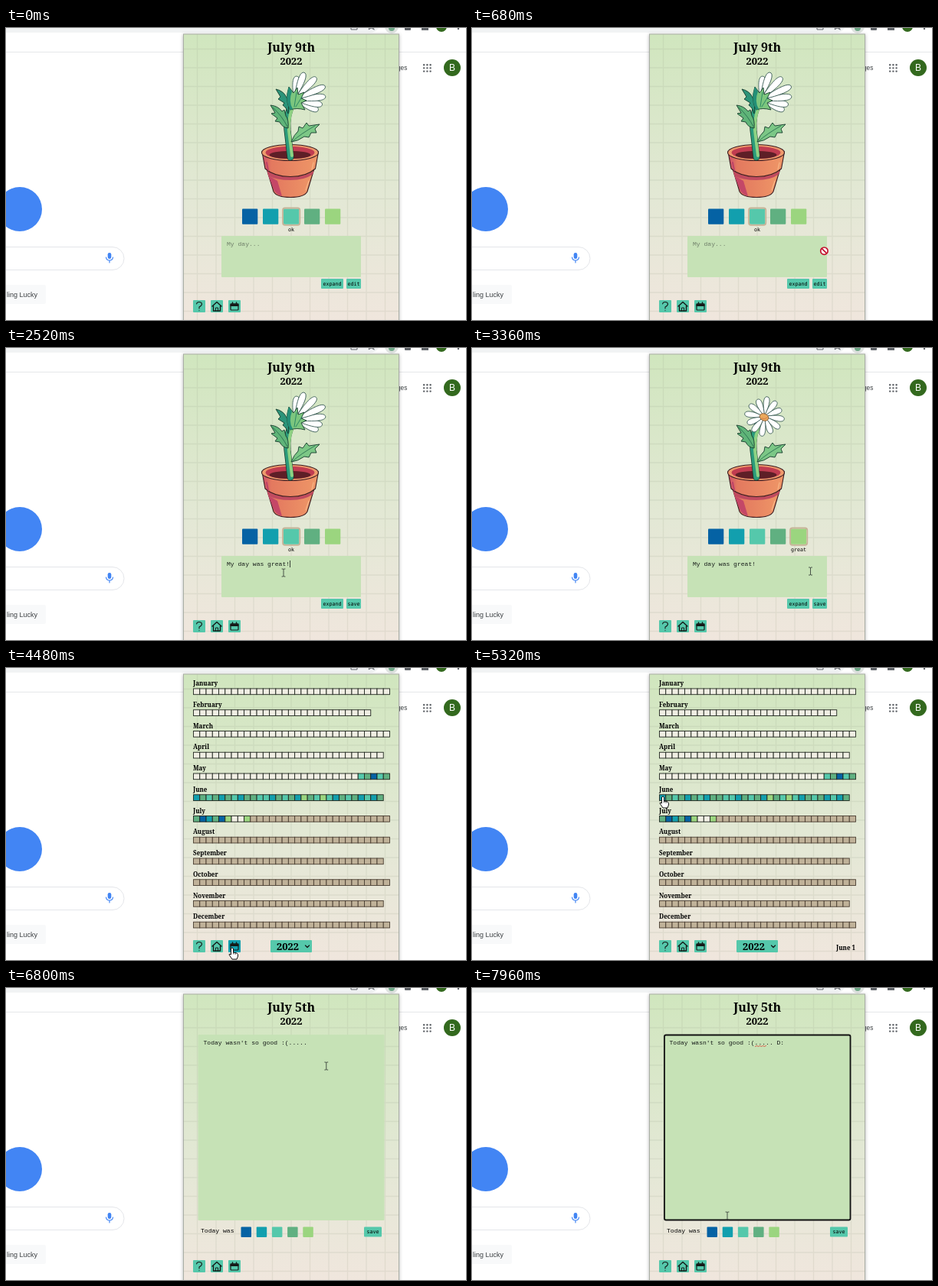
An HTML page that plays this animation: 600x382 px, repeating every 8 s.

```html
<!DOCTYPE html>
<html lang="en">
<head>
<meta charset="utf-8">
<title>Mood diary</title>
<style>
  html, body { margin: 0; width: 100%; height: 100%; overflow: hidden; background: #fff; }
  svg { display: block; width: 100%; height: 100%; }
  text { white-space: pre; }
  .sans { font: 9px "Liberation Sans", Arial, sans-serif; fill: #3c4043; }
  .serif { font: bold 8px "Noto Serif", serif; }
  .mono { font: 8.05px "Liberation Mono", monospace; }
  .label { font: 6.67px "DejaVu Sans Mono", monospace; }
</style>
</head>
<body>
<svg viewBox="0 0 600 382">
  <defs>
    <linearGradient id="paper" x2="0" y2="1">
      <stop stop-color="#d0e6be"/><stop offset=".55" stop-color="#e3e8d5"/><stop offset="1" stop-color="#f1e6de"/>
    </linearGradient>
    <linearGradient id="clay">
      <stop stop-color="#c9486a"/><stop offset=".16" stop-color="#e3795f"/><stop offset="1" stop-color="#ef9767"/>
    </linearGradient>
    <filter id="shadow" x="-10%" y="-10%" width="120%" height="120%">
      <feDropShadow dx="0" dy="1" stdDeviation="2" flood-opacity=".3"/>
    </filter>
  </defs>
  <g id="page"></g>
  <g id="scene"></g>
  <g id="cursor"></g>
</svg>
<script>
const LOOP = 8000;
const MOODS = ['#0562a4', '#129fae', '#55c8ab', '#60b081', '#9bd57f'];
const INK = '#151a18', FIELD = '#c6e2b6';
const MONTHS = ['January', 'February', 'March', 'April', 'May', 'June', 'July',
  'August', 'September', 'October', 'November', 'December'];
const DAYS = [31, 28, 31, 30, 31, 30, 31, 31, 30, 31, 30, 31];
// Mood index per day; "-" is a day without an entry.
const ENTRIES = {
  4: '-'.repeat(26) + '23023',
  5: '132313213322132314324213231213',
  6: '301304--4'
};
const CELL = 256 / 31, ROW = 27.75;

const layer = id => document.getElementById(id);
const repeat = (n, make) => Array.from({ length: n }, (_, i) => make(i)).join('');
const clamp = v => Math.max(0, Math.min(1, v));
const rect = (x, y, w, h, fill, more = '') =>
  `<rect x="${x}" y="${y}" width="${w}" height="${h}" fill="${fill}" ${more}/>`;
const path = (d, fill, more = '') => `<path d="${d}" fill="${fill}" ${more}/>`;
const line = (d, width = 1, color = INK) =>
  path(d, 'none', `stroke="${color}" stroke-width="${width}" stroke-linecap="round" stroke-linejoin="round"`);
const text = (x, y, str, kind, more = '') => `<text x="${x}" y="${y}" class="${kind}" ${more}>${str}</text>`;
const MIDDLE = 'text-anchor="middle"';

// Cursor stops: time, x, y
const STOPS = [
  [40, 503, -20], [200, 503, 4], [820, 453, 334], [1020, 453, 334], [1400, 362, 294],
  [2540, 362, 294], [2800, 426, 247], [3000, 426, 247], [3300, 441.5, 292], [3400, 441.5, 292],
  [3580, 454, 335], [3720, 454, 335], [4120, 295, 366], [4720, 295, 366], [5240, 249, 168],
  [5360, 249, 168], [5560, 281, 199], [6040, 281, 199], [6420, 478, 319], [6580, 478, 319],
  [6860, 410, 74], [7560, 410, 74], [7920, 333, 298]
];

function cursorAt(t) {
  const next = STOPS.findIndex(s => s[0] > t);
  if (next === 0) return STOPS[0].slice(1);
  if (next < 0) return STOPS.at(-1).slice(1);
  const [t0, x0, y0] = STOPS[next - 1], [t1, x1, y1] = STOPS[next];
  const p = (t - t0) / (t1 - t0), e = p * p * (3 - 2 * p);
  return [x0 + (x1 - x0) * e, y0 + (y1 - y0) * e];
}

const POINTERS = {
  arrow: path('M0 0V13L3 10 5 15 7.500 14 5.500 9.500H9.500Z', '#fff', 'stroke="#111"'),
  hand: path('M-1.500 1Q0-1 1.500 1V6L6 7Q8 8 7.500 11L6 15H0L-4 9Q-4 7-1.500 9Z', '#fff', 'stroke="#111"') +
    line('M1.500 6V8M4 7V8.500', .8),
  beam: line('M-2-5H-.5L0-4.500 .5-5H2M0-4.500V4.500M-2 5H-.5L0 4.500 .5 5H2', .9, '#39423a'),
  blocked: '<circle r="4.700" fill="#fff" stroke="#c4122f" stroke-width="1.700"/>' + line('M-3-3 3 3', 1.7, '#c4122f')
};

function drawPage() {
  const toolbar = line('M450-2V2H458V-2M476-4 473 2 476.500 0 480 2Z', 1, '#5f6368') +
    '<circle cx="503" cy="-2" r="9" fill="#dfe3e0"/><circle cx="503" cy="0" r="4" fill="#6fa887"/>' +
    rect(520, -3, 8, 6, '#5f6368', 'rx="1"') + rect(542, -3, 9, 6, '#5f6368') +
    '<circle cx="568" cy="-2" r="7" fill="#33691e"/><circle cx="590" cy="1" r="1.200" fill="#5f6368"/>';
  const grid = line(repeat(11, i => `M${249.5 + i * 24.5} 9V382`) +
    repeat(15, i => `M232 ${27.5 + i * 24.5}H512`), 1.3, 'rgba(140,145,130,.15)');
  const mic = rect(132.7, 294, 4.6, 8, '#4285f4', 'rx="2.300"') +
    line('M130.500 300Q131 304 135 304T139.500 300M135 304V307', 1.2, '#4285f4');
  layer('page').innerHTML =
    rect(-20, -20, 508, 26, '#f1f3f4', 'rx="13"') + toolbar + rect(0, 31, 600, 1, '#e6e7e9') +
    '<circle cx="18" cy="237" r="29" fill="#4285f4"/>' +
    rect(-60, 286.5, 214, 30, '#fff', 'rx="15" stroke="#e4e6ea"') + mic +
    rect(-60, 336, 112, 25, '#f8f9fa', 'rx="2"') +
    text(41, 352, 'ling Lucky', 'sans', 'text-anchor="end"') +
    text(523.3, 55, 'ges', 'sans', 'text-anchor="end" style="font-size:8.300px"') +
    repeat(9, i => rect(544 + i % 3 * 4.2, 47 + Math.floor(i / 3) * 4.2, 2.4, 2.4, '#5f6368', 'rx="1"')) +
    '<circle cx="582" cy="52" r="11" fill="#33691e"/>' +
    text(582, 56.3, 'B', 'sans', `${MIDDLE} style="font-size:12px;fill:#fff"`) +
    rect(231.5, 8, 281, 390, 'url(#paper)', 'stroke="#a9aea5" filter="url(#shadow)"') + grid;
}

// Each petal is an angle clockwise from straight up, and a length.
function petals(list, cx, cy, width) {
  return list.map(([angle, length]) => path(`M0 0C${-width * .5} ${-length * .4} ${-width} ${-length} 0 ${-length}
    S${width * .5} ${-length * .4} 0 0Z`, '#fff',
    `transform="translate(${cx} ${cy}) rotate(${angle})" stroke="#31544e" stroke-width=".800"`)).join('');
}

function openFlower() {
  const ring = Array.from({ length: 12 }, (_, i) => [i * 30 + 8, 26 - i % 3]);
  return petals(ring, 381.5, 89.5, 6.5) +
    '<ellipse cx="381" cy="90.500" rx="6" ry="4.500" fill="#eba95c" stroke="#8b572d" stroke-width=".800" transform="rotate(25 381 90.500)"/>' +
    line('M378 92Q382 94 385 91', 1, '#d77c45');
}

function closedFlower(edge) {
  return path('M368 112Q366 104 361 101L363 98 355 93 358 90 352 80 Q362 82 366 91 370 100 368 112Z', '#2b9479', edge) +
    petals([[114, 34], [100, 37], [6, 31], [84, 41], [20, 38], [66, 44], [44, 41]], 376, 94, 7.5) +
    path('M371 107Q363 95 369 77L375 85 380 78 381 87 389 84 385 92 392 95 385 98 390 107Q379 104 371 107Z', '#7cc67e', edge) +
    path('M371 107Q363 95 369 77L373 83Q368 96 374 106Z', '#238f77') +
    line('M376 103 379 84M378 103 386 90', .9, '#238263');
}

function plant(blooming) {
  const edge = 'stroke="#163c2d" stroke-width=".900"';
  const leaves =
    path('M368 131Q360 130 357 123L351 122 354 118 346 112 351 111 345 101Q355 102 360 109L363 107 365 115Q369 120 368 131Z', '#5fb478', edge) +
    path('M372 149Q376 139 381 135L382 129 387 131 392 124 395 128 409 126 403 132 405 137 398 137 395 143 389 142Q381 148 372 149Z', '#7cc786', edge) +
    line('M348 104Q360 115 367 129M374 148Q385 138 403 128', .8, '#21664b');
  const stem = 'M371 169Q369 150 367 134 365 112 375 97';
  const clayEdge = 'stroke="#3b1b20" stroke-width="1.100"';
  const pot =
    path('M340 184 349 214Q353 221.500 371 221.500T393 214L402 184Z', 'url(#clay)', clayEdge) +
    path('M340.500 187Q353 195 371 195T401.500 187L400.500 191Q390 199 371 199 352 199 342 193Z', '#c04a5f') +
    path('M342 193 350 213Q353 218 360 220L354 200Z', '#c44767') +
    path('M334 162 338 184Q350 194.500 371 194.500T403.500 184L407.500 162Z', 'url(#clay)', clayEdge) +
    `<ellipse cx="370.500" cy="163" rx="37" ry="10.500" fill="#ee9a6c" ${clayEdge}/>` +
    '<ellipse cx="370.500" cy="163" rx="32" ry="8.200" fill="#c03c50"/>' +
    '<ellipse cx="370.500" cy="166" rx="27" ry="5.200" fill="#5e1f27"/>' +
    line('M340 176 342 186', 2, '#bd4268') + line('M401 176 399 185M395 200 391 212', 1.2, '#f7b585');
  return pot + line(stem, 9, '#163c2d') + line(stem, 7.5, '#2c9b7b') +
    line('M373 167Q371 150 369 134 368 113 377 98', 4, '#8ed283') + leaves +
    (blooming ? openFlower() : closedFlower(edge));
}

function draw(t) {
  const [x, y] = cursorAt(t);
  const over = (bx, by, w, h) => x >= bx && x <= bx + w && y >= by && y <= by + h;
  let pointer = 'arrow';

  const hot = (...box) => {
    const hit = over(...box);
    if (hit) pointer = 'hand';
    return hit;
  };
  const tile = (bx, by, w, h) =>
    rect(bx, by, w, h, hot(bx, by, w, h) ? MOODS[1] : MOODS[2], 'rx="1"');
  const button = (bx, by, w, h, str) =>
    tile(bx, by, w, h) + text(bx + w / 2, by + h / 2 + 2, str, 'label', MIDDLE);
  const swatches = (x0, y0, step, size) => MOODS.map((color, i) => {
    hot(x0 + i * step, y0, size, size);
    return rect(x0 + i * step, y0, size, size, color, 'rx="1"');
  }).join('');
  const field = (bx, by, w, h, editing, str, color) => {
    if (over(bx, by, w, h)) pointer = editing ? 'beam' : 'blocked';
    return rect(bx, by, w, h, FIELD, 'rx="1"') + text(bx + 7, by + 13.2, str, 'mono', `fill="${color}"`);
  };
  const heading = date => text(372, 30.5, date, 'serif', `${MIDDLE} style="font-size:16px"`) +
    text(372, 47.5, '2022', 'serif', `${MIDDLE} style="font-size:13px"`);
  const caret = (cx, cy) => rect(cx, cy, .8, 9, INK);

  function home() {
    const editing = t >= 940 && t < 3660, great = t >= 2880;
    const entry = 'My day was great!';
    const typed = entry.slice(0, Math.floor(clamp((t - 1700) / 800) * entry.length));
    const mood = great ? 4 : 2;
    return heading('July 9th') + plant(great) +
      swatches(308, 236.5, 27, 20.3) +
      rect(307 + mood * 27, 235.5, 22.3, 22.3, 'none', 'rx="3" stroke="#c6b397" stroke-width="1.800"') +
      text(318 + mood * 27, 266, great ? 'great' : 'ok', 'label', MIDDLE) +
      field(281, 272, 182, 54, editing, typed || 'My day...', typed && editing ? INK : '#6f7f69') +
      (t >= 1700 && t < 2540 ? caret(288 + typed.length * 4.83, 278) : '') +
      button(411, 328, 29, 13, 'expand') + button(444, 328, 19, 13, editing ? 'save' : 'edit');
  }

  function calendar() {
    let hovered = '';
    const rows = MONTHS.map((month, m) => {
      const top = 27 + m * ROW;
      const cells = repeat(DAYS[m], d => {
        const left = 244.5 + d * CELL;
        if (hot(left, top, CELL, 8)) hovered = `${month} ${d + 1}`;
        const future = m > 6 || m === 6 && d > 8;
        const color = future ? '#c0b299' : MOODS[ENTRIES[m]?.[d]] ?? '#f0eee3';
        return rect(left.toFixed(2), top, CELL, 7.7, color, `stroke="${future ? '#493d31' : '#20261f'}" stroke-width=".900"`);
      });
      return text(244, top - 4, month, 'serif') + cells;
    }).join('');
    return rows + tile(345, 356, 54, 16) +
      text(353, 369, '2022', 'serif', 'style="font-size:13px"') + line('M390.500 363 393 365.500 395.500 363', 1.3) +
      text(500, 369, hovered, 'serif', 'text-anchor="end"');
  }

  function day() {
    const editing = t >= 6500;
    const extra = ' D:'.slice(0, Math.floor(clamp((t - 7120) / 360) * 3));
    const entry = "Today wasn't so good :(....." + extra;
    return heading('July 5th') +
      field(250.5, 61, 243, 243, editing, entry, editing ? INK : '#596a55') +
      (t >= 6900 ? rect(251, 61.5, 242.5, 242, 'none', 'rx="2" stroke="#111" stroke-width="1.800"') +
        line('M369.500 76.500' + repeat(7, i => `l2 ${i % 2 ? 1 : -1}`), .9, '#dd4b3e') : '') +
      (t >= 6900 && t < 7560 ? caret(257.5 + entry.length * 4.83, 67) : '') +
      text(254, 320, editing ? 'Today was' : 'Today was awful', 'mono', 'font-style="italic"') +
      (editing ? swatches(306.5, 312.5, 20.2, 13.5) : rect(335.5, 312.5, 14, 13.5, MOODS[0], 'rx="1"')) +
      button(467, 312.5, 23, 13, editing ? 'save' : 'edit');
  }

  const view = t < 4280 ? home() : t < 5640 ? calendar() : day();
  const icons = [244, 267, 290].map(left => tile(left, 356, 16, 16)).join('') +
    line('M248.500 361Q249 358.500 252 358.500T255.500 361Q255.500 363 252 365V367M252 369.500V369.600', 1.1) +
    line('M269 364 275 358.500 281 364M270.500 364V370H279.500V364', 1.4) + line('M273.500 370V366H276.500V370') +
    rect(293, 361, 10, 8, 'none', `rx="1" stroke="${INK}" stroke-width="1.200"`) +
    rect(292.5, 360.5, 11, 3.5, INK) + line('M295.500 359V361M300.500 359V361', 1.4);

  layer('scene').innerHTML = view + icons;
  layer('cursor').innerHTML = `<g transform="translate(${x.toFixed(2)} ${y.toFixed(2)})">${POINTERS[pointer]}</g>`;
}

function tick() {
  draw(performance.now() % LOOP);
  requestAnimationFrame(tick);
}

drawPage();
tick();
</script>
</body>
</html>
```
